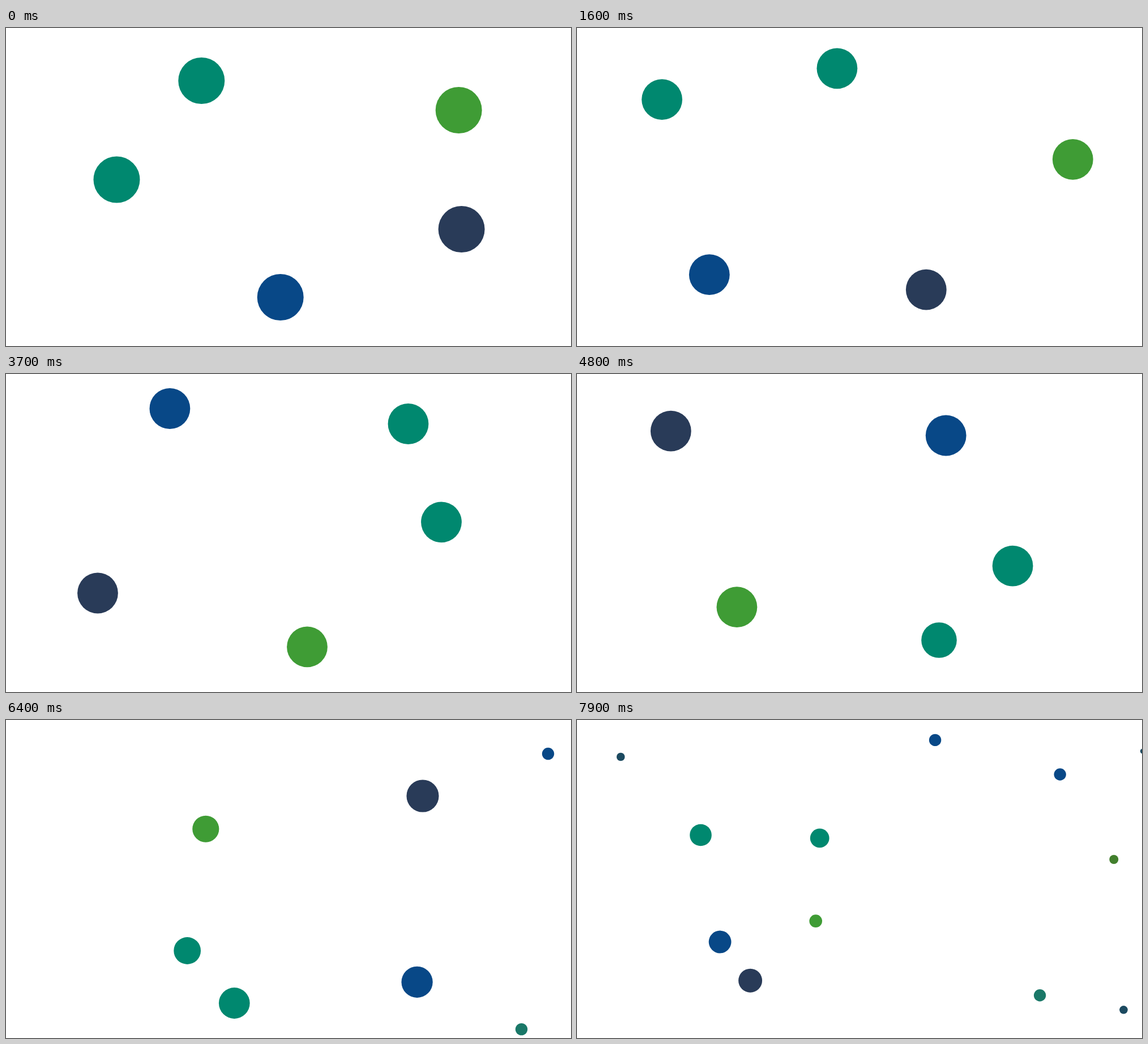
An HTML page for the animation above (8 s loop, 998 by 561 pixels).

```html
<!DOCTYPE html>
<html lang="en">
<head>
<meta charset="utf-8">
<title>Swirling dots</title>
<style>
  html, body { margin: 0; width: 100%; height: 100%; overflow: hidden; background: #fff; }
  svg { display: block; width: 998px; height: 561px; }
</style>
</head>
<body>
<svg id="stage" viewBox="0 0 998 561"></svg>
<script>
const LOOP = 8000, STEP = 100, TURN = 2 * Math.PI;
const TEAL = '#00886f', GREEN = '#3f9c35', NAVY = '#293b58', BLUE = '#084887', SLATE = '#1c4a60';
const ORBIT = { x: 499, y: 270, rx: 415, ry: 215 };
const SINK = { x: 438, y: 241 };
const TIMES = [0, 1600, 2700, 3700, 4800, 6400, 7900];
const stage = document.getElementById('stage');
const parts = [];

function add(fill, pose) {
  const el = document.createElementNS('http://www.w3.org/2000/svg', 'circle');
  el.setAttribute('fill', fill);
  stage.append(el);
  parts.push({ el, pose });
}

// Smooth curve through one value per entry of TIMES.
function curve(values) {
  const last = values.length - 1;
  const gap = k => TIMES[k + 1] - TIMES[k];
  const rate = k => (values[k + 1] - values[k]) / gap(k);
  const slopes = values.map((_, k) => {
    if (k === 0) return rate(0);
    if (k === last) return rate(last - 1);
    return (rate(k - 1) * gap(k) + rate(k) * gap(k - 1)) / (gap(k - 1) + gap(k));
  });
  return t => {
    let i = 0;
    while (i < last - 1 && t >= TIMES[i + 1]) i++;
    const u = (t - TIMES[i]) / gap(i), v = 1 - u;
    return values[i] * (1 + 2 * u) * v * v + values[i + 1] * u * u * (3 - 2 * u) +
      gap(i) * u * v * (slopes[i] * v - slopes[i + 1] * u);
  };
}

// Clockwise swirl through key points, eased as angle and reach around the orbit ellipse.
function swirl(points) {
  const unit = points.map(([x, y]) => [(x - ORBIT.x) / ORBIT.rx, (y - ORBIT.y) / ORBIT.ry]);
  const angles = [];
  for (const [x, y] of unit) {
    let a = Math.atan2(y, x);
    while (angles.length && a < angles.at(-1)) a += TURN;
    angles.push(a);
  }
  const angle = curve(angles), reach = curve(unit.map(p => Math.hypot(...p)));
  return t => [
    ORBIT.x + ORBIT.rx * reach(t) * Math.cos(angle(t)),
    ORBIT.y + ORBIT.ry * reach(t) * Math.sin(angle(t))];
}

// Large ball: settles in the first second, later shrinks steadily.
function ball(fill, shrinkAt, shrinkRate, points) {
  const path = swirl(points);
  add(fill, t => {
    const settle = 5.1 * Math.max(0, 1 - t / 1000);
    const shrink = shrinkRate * Math.max(0, t - shrinkAt) / 1000;
    return [...path(t), 35.9 + settle - shrink];
  });
}

// Small dot: drifts straight at the sink, smaller ones faster; placed as at the last key time.
function dot(fill, r, x, y) {
  const dx = SINK.x - x, dy = SINK.y - y, speed = 155 - 7.6 * r;
  add(fill, t => {
    const k = speed * (t - TIMES.at(-1)) / 1000 / Math.hypot(dx, dy);
    return [x + dx * k, y + dy * k, r];
  });
}

ball(TEAL, 3810, 4.64,
  [[345.3, 93], [459.4, 71.3], [602.4, 101.4], [769, 261.3], [639.5, 469.5], [320.2, 407], [428.7, 208.4]]);
ball(TEAL, 4820, 5.39,
  [[195.5, 267.5], [150.1, 126.2], [344.7, 61.8], [710.5, 88], [769.6, 338.6], [403.3, 499.5], [218.5, 203]]);
ball(GREEN, 4885, 8.15,
  [[799.7, 145], [875.8, 231.8], [812.5, 397], [532, 481.4], [282.4, 411.2], [352.8, 192.2], [421.7, 354.7]]);
ball(NAVY, 4945, 5.05,
  [[804.6, 355], [616.8, 461.7], [395.1, 470.2], [162, 386.5], [165.8, 100.7], [736, 134], [306.1, 459.7]]);
ball(BLUE, 4800, 5.16,
  [[484.7, 475], [233.8, 435.2], [86.6, 219], [289.4, 61], [651.7, 108.5], [726.1, 462.3], [252.6, 391.5]]);

dot(BLUE, 10.7, 853.2, 96);
dot('#1a7868', 10.7, 817.6, 485.7);
dot(BLUE, 10.7, 632.6, 35.4);
dot(SLATE, 7.3, 77.2, 65);
dot(SLATE, 7.3, 965.5, 511.3);
dot('#427f2d', 8, 948.3, 246);
dot(SLATE, 4.5, 999.3, 55);

function draw(now) {
  const t = Math.floor(now % LOOP / STEP) * STEP;
  for (const { el, pose } of parts) {
    const [x, y, r] = pose(t);
    el.setAttribute('cx', x.toFixed(2));
    el.setAttribute('cy', y.toFixed(2));
    el.setAttribute('r', r.toFixed(2));
  }
}

const start = performance.now();
function tick() {
  draw(performance.now() - start);
  requestAnimationFrame(tick);
}
tick();
</script>
</body>
</html>
```
